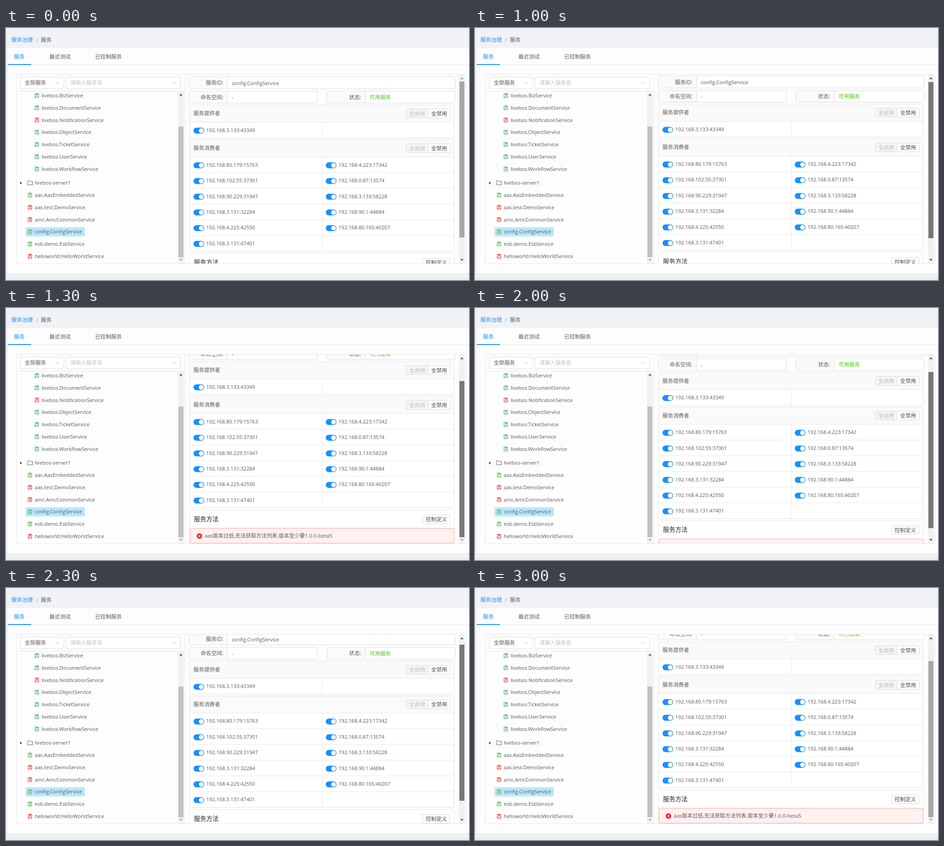
An HTML page that plays this animation: 1015 by 552 pixels, repeating every 4500 ms.

```html
<!DOCTYPE html>
<html lang="zh-CN">
<head>
<meta charset="utf-8">
<title>服务治理</title>
<style>
@property --scroll { syntax: "<number>"; inherits: true; initial-value: 0; }
html, body { margin: 0; width: 100%; height: 100%; overflow: hidden; background: #f0f2f5; }
svg {
  display: block; width: 1015px; height: 552px;
  font: 11.1px "Open Sans", "Noto Sans CJK SC", "Noto Sans CJK", sans-serif;
  animation: drag 4.5s step-end infinite;
}
text { fill: #595959; white-space: pre; }
.cn { font-size: 11.7px; }
#pane { transform: translateY(calc(var(--scroll) * -1px)); }
#thumb { transform: translateY(calc(var(--scroll) * .843px)); fill: var(--thumb); }
#up { fill: var(--up); }
#down { fill: var(--down); }
@keyframes drag {
  0%      { --scroll: 0;    --thumb: #a8a8a8; --up: #a3a3a3; --down: #505050; }
  22.22%  { --scroll: 1.7;  --thumb: #787878; --up: #505050; --down: #505050; }
  24.44%  { --scroll: 15;   --thumb: #787878; --up: #505050; --down: #505050; }
  26.66%  { --scroll: 35;   --thumb: #787878; --up: #505050; --down: #505050; }
  28.88%  { --scroll: 51;   --thumb: #787878; --up: #505050; --down: #a3a3a3; }
  44.44%  { --scroll: 27.5; --thumb: #787878; --up: #505050; --down: #505050; }
  46.66%  { --scroll: 17;   --thumb: #787878; --up: #505050; --down: #505050; }
  48.88%  { --scroll: 11;   --thumb: #787878; --up: #505050; --down: #505050; }
  51.11%  { --scroll: 8.3;  --thumb: #787878; --up: #505050; --down: #505050; }
  55.55%  { --scroll: 32;   --thumb: #787878; --up: #505050; --down: #505050; }
  57.77%  { --scroll: 51;   --thumb: #787878; --up: #505050; --down: #a3a3a3; }
  64.44%, 100% { --scroll: 51; --thumb: #a8a8a8; --up: #505050; --down: #a3a3a3; }
}
</style>
</head>
<body>
<svg id="stage" viewBox="0 0 1015 552"></svg>
<script>
const BLUE = '#1890ff', GREEN = '#52b83c', RED = '#f0383f', EDGE = '#dcdcdc', LINE = '#e8e8e8';

const rect = (x1, y1, x2, y2, fill, stroke = 'none', r = 0) =>
  `<rect x="${x1}" y="${y1}" width="${x2 - x1}" height="${y2 - y1}" rx="${r}" fill="${fill}" stroke="${stroke}"/>`;
const path = (d, stroke, fill = 'none', extra = '') =>
  `<path d="${d}" stroke="${stroke}" fill="${fill}" ${extra}/>`;
// Text is placed by its vertical centre.
const text = (s, x, y, style = '') => `<text x="${x}" y="${y + 4}" style="${style}">${s}</text>`;
const cn = (s, x, y, style = '') => `<text class="cn" x="${x}" y="${y + 4.4}" style="${style}">${s}</text>`;
const label = (s, x, y) => cn(s, x, y, 'text-anchor:end');
const arrow = (x, y, dir, attr) =>
  `<path d="M${x - 3.5} ${y + 2 * dir}h7l-3.5 ${-4 * dir}z" ${attr}/>`;
const chevron = (x, y) => path(`M${x - 4} ${y - 2}l4 4l4 -4`, '#c4c4c4');

const book = (x, y, color) =>
  path(`M${x + .5} ${y - 4.5}h8v9h-8zM${x + .5} ${y + 2}h8`, color) +
  path(`M${x + 3} ${y - 4}h3.6v4l-1.8 -1.3l-1.8 1.3z`, 'none', color);
const leaf = (name, x, y, color) => book(x, y, color) + text(name, x + 15, y);

function tree() {
  const inner = ['Biz', 'Document', 'Notification', 'Object', 'Ticket', 'User', 'Workflow'];
  const outer = ['aas.AasEmbedded', 'aas.test.Demo', 'amc.AmcCommon', 'config.Config', 'esb.demo.Esb', 'helloworld.HelloWorld'];
  const step = 26.8;
  return rect(43, 436.5, 173, 456.5, '#bae7ff', 'none', 2) +
    inner.map((n, i) => leaf(`livebos.${n}Service`, 63, 148 + i * step, i === 2 ? RED : '#45b36b')).join('') +
    path('M31 336.3l4 3.2l-4 3.2z', 'none', '#444') +
    path('M47.5 334.5h4l1.5 2h5.5v7h-11z', '#666') +
    text('livebos-server1', 63, 339) +
    outer.map((n, i) => leaf(`${n}Service`, 48, 366 + i * step, [1, 2, 5].includes(i) ? RED : GREEN)).join('');
}

function leftPanel() {
  return rect(31.5, 107.5, 126.5, 133, '#fff', EDGE, 3) +
    cn('全部服务', 41, 120) + chevron(112, 120) +
    rect(131.5, 107.5, 382.5, 133, '#fff', EDGE, 3) +
    cn('请输入服务名', 141, 120, 'fill:#bfbfbf') + chevron(368, 120) +
    path('M23 138.5H377', LINE) + tree() +
    rect(377, 138, 390, 516, '#f1f1f1') + rect(378, 216, 389, 502, '#c1c1c1') +
    arrow(383.5, 146, 1, 'fill="#505050"') + arrow(383.5, 508, -1, 'fill="#a3a3a3"');
}

const field = (x1, x2, split, y, name) =>
  rect(x1, y, x2, y + 26, '#fff', EDGE, 3) +
  path(`M${x1 + .5} ${y + .5}H${split}V${y + 25.5}H${x1 + .5}z`, 'none', '#fafafa') +
  path(`M${split} ${y}v26`, EDGE) + label(name, split - 9, y + 13);

const endpoint = (addr, x, y) =>
  rect(x, y - 5.5, x + 23.5, y + 7.5, BLUE, 'none', 6.5) +
  `<circle cx="${x + 17}" cy="${y + 1}" r="5.2" fill="#fff"/>` + text(addr, x + 28, y);

const button = (s, x1, x2, y, off) =>
  rect(x1, y - 9.5, x2, y + 9.5, off ? '#f5f5f5' : '#fff', '#d9d9d9', 2) +
  cn(s, (x1 + x2) / 2, y, `text-anchor:middle;fill:${off ? '#bdbdbd' : '#4a4a4a'}`);

function group(title, top, addrs) {
  const rowH = 34.4, rows = Math.ceil(addrs.length / 2), head = top + 37.5;
  const bottom = head + rows * rowH;
  let out = rect(402.5, top, 982.5, bottom, '#fff', '#e2e2e2', 2) +
    rect(403, top + .5, 982, head, '#fafafa') +
    cn(title, 411, top + 18) +
    button('全启用', 877.5, 925.5, top + 18.5, true) + button('全禁用', 925.5, 973.5, top + 18.5) +
    path(`M693.5 ${head}V${bottom}`, LINE);
  for (let i = 0; i < rows; i++) out += path(`M403 ${head + i * rowH}H982`, LINE);
  addrs.forEach((a, i) => {
    out += endpoint(a, i % 2 ? 701 : 411, head + 17.5 + (i >> 1) * rowH);
  });
  return out;
}

function detail() {
  return field(401.5, 984.5, 485.5, 107, '服务ID:') + text('config.ConfigService', 495, 121) +
    field(401.5, 682.5, 485.5, 138.3, '命名空间:') + text('-', 495, 152) +
    field(703.5, 984.5, 787.5, 138.3, '状态:') + cn('可用服务', 797, 151.5, 'fill:#52c41a') +
    group('服务提供者', 168.7, ['192.168.3.133:43349']) +
    group('服务消费者', 244.8, [
      '192.168.80.179:15763', '192.168.4.223:17342', '192.168.102.55:37301', '192.168.0.87:13574',
      '192.168.90.229:31947', '192.168.3.133:58228', '192.168.3.131:32284', '192.168.90.1:44884',
      '192.168.4.225:42550', '192.168.80.165:40207', '192.168.3.131:47401']) +
    rect(402.5, 493.5, 982.5, 567, '#fff', LINE, 2) +
    cn('服务方法', 412, 513.5, 'font-size:13.5px;fill:#262626') +
    button('控制定义', 913.5, 973.5, 514) +
    rect(403.5, 533.5, 982.5, 566, '#fff1f0', '#f5a6a2', 2) +
    '<circle cx="424" cy="550.5" r="6" fill="#f5222d"/>' +
    path('M422 548.5l4 4m0 -4l-4 4', '#fff', 'none', 'stroke-width="1.2"') +
    cn('aas版本过低,无法获取方法列表.版本至少要1.0.0-beta5', 435.5, 550, 'font-size:11.5px');
}

document.getElementById('stage').innerHTML =
  '<defs><clipPath id="view"><rect x="393" y="102" width="599" height="414"/></clipPath></defs>' +
  rect(0, 0, 1015, 552, '#f0f2f5') +
  cn('服务治理', 12, 26, `fill:${BLUE}`) + text('/', 66, 26, 'fill:#8c8c8c') + cn('服务', 76.5, 26) +
  rect(4, 44, 1015, 538, '#fdfdfd') +
  path('M4 80.5H1015', '#e4e6e9') + rect(4, 79, 55, 81, BLUE) +
  cn('服务', 17.5, 63, `fill:${BLUE}`) + cn('最近测试', 95, 63) + cn('已控制服务', 195.5, 63) +
  path('M4 538.5H1015', '#e0e2e5') + path('M0 549H1015', '#d9dce0') +
  rect(22.5, 101.5, 1008.5, 516.5, '#fdfdfd', LINE) + path('M392.5 102V516', LINE) +
  leftPanel() +
  `<g clip-path="url(#view)"><g id="pane">${detail()}</g></g>` +
  rect(993, 102, 1006, 516, '#f1f1f1') +
  '<rect id="thumb" x="994" y="117" width="11" height="342"/>' +
  arrow(999.5, 110, 1, 'id="up"') + arrow(999.5, 508, -1, 'id="down"');
</script>
</body>
</html>
```
